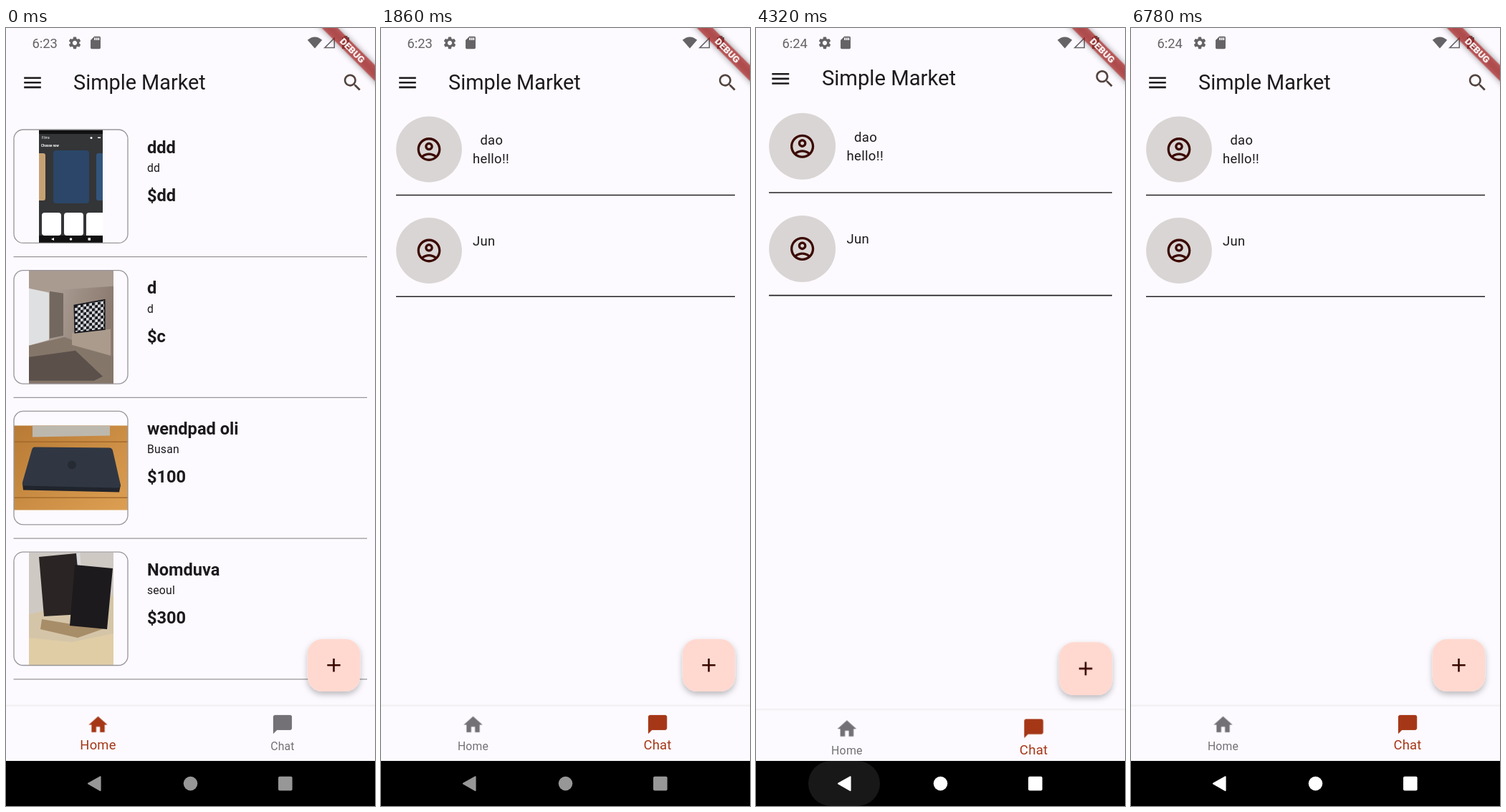
Recreate the animation shown at these times as an HTML page. Size 515 by 1087 pixels, loop 6.84 s.

```html
<!DOCTYPE html>
<html lang="en">
<head>
<meta charset="utf-8">
<title>Simple Market</title>
<style>
html, body { margin: 0; width: 100%; height: 100%; overflow: hidden; background: #fcfafe; }
svg { display: block; width: 515px; height: 1087px; font-family: Roboto, sans-serif; }
svg * { animation: 6840ms linear infinite; }

.bg { fill: #fcfafe; }
.ink { fill: #1c1a1d; }
.soft { fill: #53433f; }
.dark { fill: #3b0900; }
.title { font-size: 28.85px; }
.body { font-size: 18.36px; letter-spacing: .33px; }
.small { font-size: 15.73px; letter-spacing: .2px; }
.bold { font-size: 23.6px; font-weight: 700; }
.mid { text-anchor: middle; }
.frame { fill: none; stroke: #98969a; stroke-width: 1.3; }
.rule { stroke: #98969a; stroke-width: 1.3; }
.line { stroke: #242226; stroke-width: 1.6; }

/* screens */
.main, .page { transform-origin: 257.5px 512px; }
.main { animation-name: main; }
.scrim { animation-name: scrim; }
.one { animation-name: one-zoom, one-fade; }
.two { animation-name: two-zoom, two-fade; }
.goods { animation-name: goods; animation-timing-function: step-end; }
.chats { animation-name: chats; animation-timing-function: step-end; }
.talk { animation-name: talk; animation-timing-function: step-end; }
.before { animation-name: before; animation-timing-function: step-end; }
.after { animation-name: after; animation-timing-function: step-end; }

/* tabs and system buttons */
.tab-a { animation-name: fill-off; }
.tab-b { animation-name: fill-on; }
.tab-a text { transform-origin: 128.5px 1015px; animation-name: shrink; }
.tab-b text { transform-origin: 386px 1015px; animation-name: grow; }
.splash { transform-origin: 386px 985px; animation-name: spread, splash-fade; }
.keys { animation-name: keys; }
.press { animation-name: press; }

@keyframes main {
  0%, 43.86% { transform: none; animation-timing-function: cubic-bezier(.05,0,.1333,.06); }
  44.591% { transform: scale(1.02); animation-timing-function: cubic-bezier(.2083,.82,.25,1); }
  48.246%, 61.403% { transform: scale(1.05); }
  61.404% { transform: scale(1.1); animation-timing-function: cubic-bezier(.05,0,.1333,.06); }
  62.135% { transform: scale(1.06); animation-timing-function: cubic-bezier(.2083,.82,.25,1); }
  65.789%, 73.977% { transform: scale(1); animation-timing-function: cubic-bezier(.05,0,.1333,.06); }
  74.708% { transform: scale(1.02); animation-timing-function: cubic-bezier(.2083,.82,.25,1); }
  78.363%, 92.981% { transform: scale(1.05); }
  92.982% { transform: scale(1.1); animation-timing-function: cubic-bezier(.05,0,.1333,.06); }
  93.713% { transform: scale(1.06); animation-timing-function: cubic-bezier(.2083,.82,.25,1); }
  97.368%, 100% { transform: none; }
}
@keyframes scrim {
  0%, 44.77% { opacity: 0; }
  45.691%, 48.246% { opacity: .6; }
  48.247%, 74.886% { opacity: 0; }
  75.808%, 78.363% { opacity: .6; }
  78.364%, 100% { opacity: 0; }
}
@keyframes one-zoom {
  0%, 43.86% { transform: scale(.85); animation-timing-function: cubic-bezier(.05,0,.1333,.06); }
  44.591% { transform: scale(.91); animation-timing-function: cubic-bezier(.2083,.82,.25,1); }
  48.246%, 61.404% { transform: scale(1); animation-timing-function: cubic-bezier(.05,0,.1333,.06); }
  62.135% { transform: scale(.96); animation-timing-function: cubic-bezier(.2083,.82,.25,1); }
  65.789%, 100% { transform: scale(.9); }
}
@keyframes one-fade {
  0%, 44.408% { opacity: 0; }
  44.956%, 61.765% { opacity: 1; }
  62.314%, 100% { opacity: 0; }
}
@keyframes two-zoom {
  0%, 73.977% { transform: scale(.85); animation-timing-function: cubic-bezier(.05,0,.1333,.06); }
  74.708% { transform: scale(.91); animation-timing-function: cubic-bezier(.2083,.82,.25,1); }
  78.363%, 92.982% { transform: scale(1); animation-timing-function: cubic-bezier(.05,0,.1333,.06); }
  93.713% { transform: scale(.96); animation-timing-function: cubic-bezier(.2083,.82,.25,1); }
  97.368%, 100% { transform: scale(.9); }
}
@keyframes two-fade {
  0%, 74.525% { opacity: 0; }
  75.073%, 93.344% { opacity: 1; }
  93.893%, 100% { opacity: 0; }
}
@keyframes goods { 0% { opacity: 1; } 2.193%, 100% { opacity: 0; } }
@keyframes chats { 0% { opacity: 0; } 24.561%, 100% { opacity: 1; } }
@keyframes talk { 0% { opacity: 0; } 49.123%, 100% { opacity: 1; } }
@keyframes before { 0% { opacity: 1; } 60.526%, 100% { opacity: 0; } }
@keyframes after { 0% { opacity: 0; } 60.526%, 100% { opacity: 1; } }

@keyframes fill-off { 0%, 2.193% { fill: #a53717; } 5.117%, 100% { fill: #737175; } }
@keyframes fill-on { 0%, 2.193% { fill: #737175; } 5.117%, 100% { fill: #a53717; } }
@keyframes shrink { 0%, 2.193% { transform: scale(1.167); } 5.117%, 100% { transform: none; } }
@keyframes grow { 0%, 2.193% { transform: none; } 5.117%, 100% { transform: scale(1.167); } }
@keyframes spread {
  0%, .877% { transform: scale(0); animation-timing-function: cubic-bezier(.4,0,.2,1); }
  7.643%, 100% { transform: scale(1); }
}
@keyframes splash-fade {
  0%, .877% { opacity: 0; }
  2.05%, 4.485% { opacity: 1; }
  9.9%, 100% { opacity: 0; }
}
@keyframes keys {
  0%, 59.649% { fill: #979797; }
  60.526%, 81.579% { fill: #fff; }
  89.5%, 91.228% { fill: #979797; }
  92.105%, 100% { fill: #fff; }
}
@keyframes press {
  0%, 59.649% { opacity: 0; }
  60.6% { opacity: .2; }
  65.5%, 91.228% { opacity: 0; }
  92.105% { opacity: .2; }
  97%, 100% { opacity: 0; }
}
</style>
</head>
<body>
<svg viewBox="0 0 515 1087">
<defs>
  <g id="menu"><path transform="translate(-12 -12)" d="M3 18h18v-2H3zm0-5h18v-2H3zm0-7v2h18V6z"/></g>
  <g id="search"><path transform="translate(-12 -12)" d="M15.5 14h-.79l-.28-.27C15.41 12.59 16 11.11 16 9.5 16 5.91 13.09 3 9.5 3S3 5.91 3 9.5 5.91 16 9.5 16c1.61 0 3.09-.59 4.23-1.57l.27.28v.79l5 4.99L20.49 19zm-6 0C7.01 14 5 11.99 5 9.5S7.01 5 9.5 5 14 7.01 14 9.5 11.99 14 9.5 14z"/></g>
  <g id="arrow"><path transform="translate(-12 -12)" d="M20 11H7.83l5.59-5.59L12 4l-8 8 8 8 1.41-1.41L7.83 13H20z"/></g>
  <g id="house"><path transform="translate(-12 -12)" d="M10 20v-6h4v6h5v-8h3L12 3 2 12h3v8z"/></g>
  <g id="bubble"><path transform="translate(-12 -12)" d="M20 2H4c-1.1 0-2 .9-2 2v18l4-4h14c1.1 0 2-.9 2-2V4c0-1.1-.9-2-2-2z"/></g>
  <g id="plus"><path transform="translate(-12 -12)" d="M19 13h-6v6h-2v-6H5v-2h6V5h2v6h6z"/></g>
  <g id="send"><path transform="translate(-12 -12)" d="M2.01 21 23 12 2.01 3 2 10l15 2-15 2z"/></g>
  <g id="gear"><path transform="translate(-12 -12)" d="M19.14 12.94c.04-.3.06-.61.06-.94 0-.32-.02-.64-.07-.94l2.03-1.58c.18-.14.23-.41.12-.61l-1.92-3.32c-.12-.22-.37-.29-.59-.22l-2.39.96c-.5-.38-1.03-.7-1.62-.94l-.36-2.54c-.04-.24-.24-.41-.48-.41h-3.84c-.24 0-.43.17-.47.41l-.36 2.54c-.59.24-1.13.57-1.62.94l-2.39-.96c-.22-.08-.47 0-.59.22L2.74 8.87c-.12.21-.08.47.12.61l2.03 1.58c-.05.3-.09.63-.09.94s.02.64.07.94l-2.03 1.58c-.18.14-.23.41-.12.61l1.92 3.32c.12.22.37.29.59.22l2.39-.96c.5.38 1.03.7 1.62.94l.36 2.54c.05.24.24.41.48.41h3.84c.24 0 .44-.17.47-.41l.36-2.54c.59-.24 1.13-.56 1.62-.94l2.39.96c.22.08.47 0 .59-.22l1.92-3.32c.12-.22.07-.47-.12-.61zM12 15.6c-1.98 0-3.6-1.62-3.6-3.6s1.62-3.6 3.6-3.6 3.6 1.62 3.6 3.6-1.62 3.6-3.6 3.6z"/></g>
  <g id="card"><path transform="translate(-12 -12)" d="M18 2h-8L4.02 8 4 20c0 1.1.9 2 2 2h12c1.1 0 2-.9 2-2V4c0-1.1-.9-2-2-2zm-6 6h-2V4h2zm3 0h-2V4h2zm3 0h-2V4h2z"/></g>
  <g id="person">
    <circle r="45.9" fill="#d9d5d4"/>
    <path class="dark" transform="scale(1.64) translate(-12 -12)" fill-rule="evenodd" d="M12 2C6.48 2 2 6.48 2 12s4.48 10 10 10 10-4.48 10-10S17.52 2 12 2zM7.35 18.5C8.66 17.56 10.26 17 12 17s3.34.56 4.65 1.5c-1.31.94-2.91 1.5-4.65 1.5s-3.34-.56-4.65-1.5zm10.79-1.38C16.45 15.8 14.32 15 12 15s-4.45.8-6.14 2.12C4.7 15.73 4 13.95 4 12c0-4.42 3.58-8 8-8s8 3.58 8 8c0 1.95-.7 3.73-1.86 5.12zM12 6c-1.93 0-3.5 1.57-3.5 3.5S10.07 13 12 13s3.5-1.57 3.5-3.5S13.93 6 12 6zm0 5c-.83 0-1.5-.67-1.5-1.5S11.17 8 12 8s1.5.67 1.5 1.5S12.83 11 12 11z"/>
  </g>
  <g id="slot">
    <rect class="frame" x="11" y="142" width="159" height="158.4" rx="13"/>
    <path class="rule" d="M10.5 319.7H504"/>
  </g>
  <g id="chatbase">
    <rect class="bg" width="515" height="1024"/>
    <use href="#arrow" class="ink" transform="translate(37 76) scale(1.311)"/>
    <path class="frame" d="M.6 1023.3V959.5a26 26 0 0 1 26-26h461.8a26 26 0 0 1 26 26v63.8z"/>
    <path d="M0 1009.6H451" stroke="#85757a" stroke-width="1.5"/>
    <use href="#send" class="soft" transform="translate(482.5 978.3) scale(1.311)"/>
  </g>
  <clipPath id="app"><rect width="515" height="1024"/></clipPath>
  <clipPath id="bar"><rect y="948" width="515" height="76"/></clipPath>
  <clipPath id="round"><rect x="11" y="142" width="159" height="158.4" rx="13"/></clipPath>
  <radialGradient id="glow">
    <stop offset=".48" stop-opacity=".108"/>
    <stop offset=".74" stop-opacity=".05"/>
    <stop offset="1" stop-opacity="0"/>
  </radialGradient>
  <linearGradient id="wall" x2="1" y2=".3">
    <stop stop-color="#b9aea5"/><stop offset="1" stop-color="#8b7a6f"/>
  </linearGradient>
  <linearGradient id="wood" x2="1" y2="1">
    <stop stop-color="#b87a35"/><stop offset="1" stop-color="#dc9f52"/>
  </linearGradient>
  <pattern id="check" width="8" height="8" patternUnits="userSpaceOnUse" patternTransform="skewY(-8)">
    <path fill="#17181c" d="M0 0h8v8H0z"/><path fill="#d4d5da" d="M0 0h4v4H0zM4 4h4v4H4z"/>
  </pattern>
  <filter id="lift" x="-30%" y="-30%" width="160%" height="170%">
    <feDropShadow dx="0" dy="4" stdDeviation="4" flood-opacity=".26"/>
  </filter>
  <filter id="haze" x="-20%" y="-100%" width="140%" height="300%"><feGaussianBlur stdDeviation="4"/></filter>
</defs>

<g clip-path="url(#app)">
  <g class="main">
    <rect class="bg" width="515" height="1024"/>
    <use href="#menu" class="ink" transform="translate(37 76.3) scale(1.311)"/>
    <text class="title ink" x="94" y="85.5">Simple Market</text>
    <use href="#search" class="soft" transform="translate(483.6 76.4) scale(1.311)"/>

    <g class="goods">
      <g>
        <g clip-path="url(#round)">
          <path fill="#343537" d="M46 142h89v159H46z"/>
          <path fill="#111" d="M46 142h89v6H46zM46 290h89v11H46z"/>
          <g fill="#fff">
            <text x="50" y="155" font-size="4.5">Films</text>
            <text x="49" y="166" font-size="4.5" font-weight="700">Choose now</text>
            <circle cx="119" cy="153.5" r="1.5"/><path d="M128 152.5h4v1.5h-4z"/>
            <rect x="50" y="258" width="27" height="32" rx="4"/>
            <rect x="81" y="258" width="27" height="32" rx="4"/>
            <path d="M135 258h-19a4 4 0 0 0-4 4v28h23z"/>
            <path d="m63 295 4-2v4z"/><circle cx="90.500" cy="295" r="1.800"/><path d="M114.500 293.200h3.500v3.500h-3.500z"/>
          </g>
          <path fill="#c6a273" d="M46 175h6a3 3 0 0 1 3 3v60a3 3 0 0 1-3 3h-6z"/>
          <rect x="66" y="171" width="50" height="74" rx="4" fill="#2b4668"/>
          <path fill="#33557c" d="M135 175h-6a3 3 0 0 0-3 3v60a3 3 0 0 0 3 3h6z"/>
        </g>
        <use href="#slot"/>
        <g class="ink">
          <text class="bold" x="197" y="174.600">ddd</text>
          <text class="small" x="197" y="201">dd</text>
          <text class="bold" x="197" y="242">$dd</text>
        </g>
      </g>
      <g transform="translate(0 196.700)">
        <g clip-path="url(#round)">
          <path fill="url(#wall)" d="M32 142h118v159H32z"/>
          <path fill="#a99b90" d="m32 142 118 0v22L32 172z"/>
          <path fill="#dfe0e1" d="M32 167l28 6v66l-28 8z"/>
          <path fill="#73685f" d="m61 171 19 3v59l-19 4z"/>
          <path fill="#85766a" d="m32 247 50-12 68 28v38H32z"/>
          <path fill="#ab9b8c" d="m92 229 54-5v37l-54-15z"/>
          <path fill="#5b504a" d="m32 263 65-9 38 36-12 6H32z"/>
          <path fill="#17181c" d="m94.500 190 44-8v43l-43 5z"/>
          <path fill="url(#check)" d="m96 191.500 41-7.500v39.500l-40 4.500z"/>
        </g>
        <use href="#slot"/>
        <g class="ink">
          <text class="bold" x="197" y="174.600">d</text>
          <text class="small" x="197" y="201">d</text>
          <text class="bold" x="197" y="242">$c</text>
        </g>
      </g>
      <g transform="translate(0 393.400)">
        <g clip-path="url(#round)">
          <path fill="url(#wood)" d="M11 162h159v118H11z"/>
          <path fill="#bdb8ae" d="M37 162h108v14l-108 2z"/>
          <path fill="#a46a2b" d="M11 184h159v1.500H11zM11 262h159v1.500H11z"/>
          <path fill="#20242c" d="m23 243 137 2-2 10-134-3z"/>
          <path fill="#303743" d="m40 192 104 1q4 0 5 4l11 48q0 4-5 4L26 246q-4 0-3-5l13-45q1-4 4-4z"/>
          <circle cx="92" cy="217" r="6" fill="#252a33"/>
        </g>
        <use href="#slot"/>
        <g class="ink">
          <text class="bold" x="197" y="174.600">wendpad oli</text>
          <text class="small" x="197" y="201">Busan</text>
          <text class="bold" x="197" y="242">$100</text>
        </g>
      </g>
      <g transform="translate(0 590.100)">
        <g clip-path="url(#round)">
          <path fill="#d5c5a8" d="M32 143h118v158H32z"/>
          <path fill="#cfc9c4" d="M32 143h118v60l-118 26z"/>
          <path fill="#a78d68" d="m50 236 60 10 30 2-40 14-52-12z"/>
          <path fill="#e0cda6" d="m32 262 60 6 58-12v45H32z"/>
          <path fill="#d8d8da" d="m98 144 5-1 2 20-5 4z"/>
          <path fill="#2a2424" d="m46 149 52-5 8 85-53 3z"/>
          <path fill="#1c1a1d" d="m96 160 53 5-8 85-52-5z"/>
        </g>
        <use href="#slot"/>
        <g class="ink">
          <text class="bold" x="197" y="174.600">Nomduva</text>
          <text class="small" x="197" y="201">seoul</text>
          <text class="bold" x="197" y="242">$300</text>
        </g>
      </g>
    </g>

    <g class="chats">
      <use href="#person" x="67" y="169.500"/>
      <use href="#person" x="67" y="311"/>
      <path class="line" d="M21 233.500H494M21 375.300H494"/>
      <g class="body ink">
        <text class="mid" x="154.300" y="163">dao</text>
        <text x="128" y="189">hello!!</text>
        <text x="128" y="304">Jun</text>
      </g>
    </g>

    <rect y="945.500" width="515" height="2.500" fill="#f3f1f4"/>
    <rect class="bg" y="948" width="515" height="76"/>
    <g clip-path="url(#bar)"><circle class="splash" cx="386" cy="985" r="291" fill="url(#glow)"/></g>
    <g class="tab-a">
      <use href="#house" transform="translate(128.500 973.500) scale(1.311)"/>
      <text class="small mid" x="128.500" y="1009.300">Home</text>
    </g>
    <g class="tab-b">
      <use href="#bubble" transform="translate(386 973) scale(1.311)"/>
      <text class="small mid" x="386" y="1009.300">Chat</text>
    </g>
    <rect x="420.800" y="853.700" width="73.400" height="73.400" rx="21" fill="#ffd9d0" filter="url(#lift)"/>
    <use href="#plus" class="dark" transform="translate(457.500 890.300) scale(1.311)"/>
  </g>

  <rect class="scrim" width="515" height="1024"/>

  <g class="page one">
    <use href="#chatbase"/>
    <text class="title ink mid" x="257" y="85.500">dao</text>
    <g class="talk body">
      <rect x="298.500" y="812" width="206" height="52.300" rx="15.700" fill="#dddbde"/>
      <text class="ink" x="319.500" y="845">hi</text>
      <rect x="10.500" y="875" width="206" height="52.300" rx="15.700" fill="#2094f3"/>
      <text x="31.500" y="908" fill="#fff">hello!!</text>
    </g>
  </g>
  <g class="page two">
    <use href="#chatbase"/>
    <text class="title ink mid" x="257" y="85.500">Jun</text>
  </g>

  <g fill="#656366">
    <g font-size="18.360">
      <text class="before" x="36.500" y="27.600">6:23</text>
      <text class="after" x="36.500" y="27.600">6:24</text>
    </g>
    <use href="#gear" transform="translate(96 20.800) scale(.87)"/>
    <use href="#card" transform="translate(125 20.500) scale(.87)"/>
    <path d="M420.800 16.800Q431 8 441.200 16.800L431 28.500z"/>
    <path d="M444.800 27.600 458.300 14v13.600z" fill="none" stroke="#656366" stroke-width="1.500"/>
    <path d="M471.500 13v-2h5v2h2.500v16h-10V13z"/>
  </g>
  <g transform="translate(515 0) rotate(45)">
    <rect x="-80" y="36.700" width="160" height="15.730" fill-opacity=".4" filter="url(#haze)"/>
    <rect x="-80" y="36.700" width="160" height="15.730" fill="#b71c1c" fill-opacity=".63"/>
    <text class="mid" y="49.300" font-size="13.400" font-weight="900" fill="#fff">DEBUG</text>
  </g>
</g>

<rect y="1024" width="515" height="63"/>
<rect class="press" x="73" y="1024" width="100" height="63" rx="31.500" fill="#fff"/>
<g class="keys">
  <path d="M114.500 1054.800 131 1045.400q1.600-.8 1.600.9v18.800q0 1.700-1.600.9L114.500 1056.600q-1.200-.9 0-1.800z"/>
  <circle cx="257.500" cy="1055.600" r="9.800"/>
  <rect x="380" y="1045.800" width="19.600" height="19.600" rx="2"/>
</g>
</svg>
</body>
</html>
```
